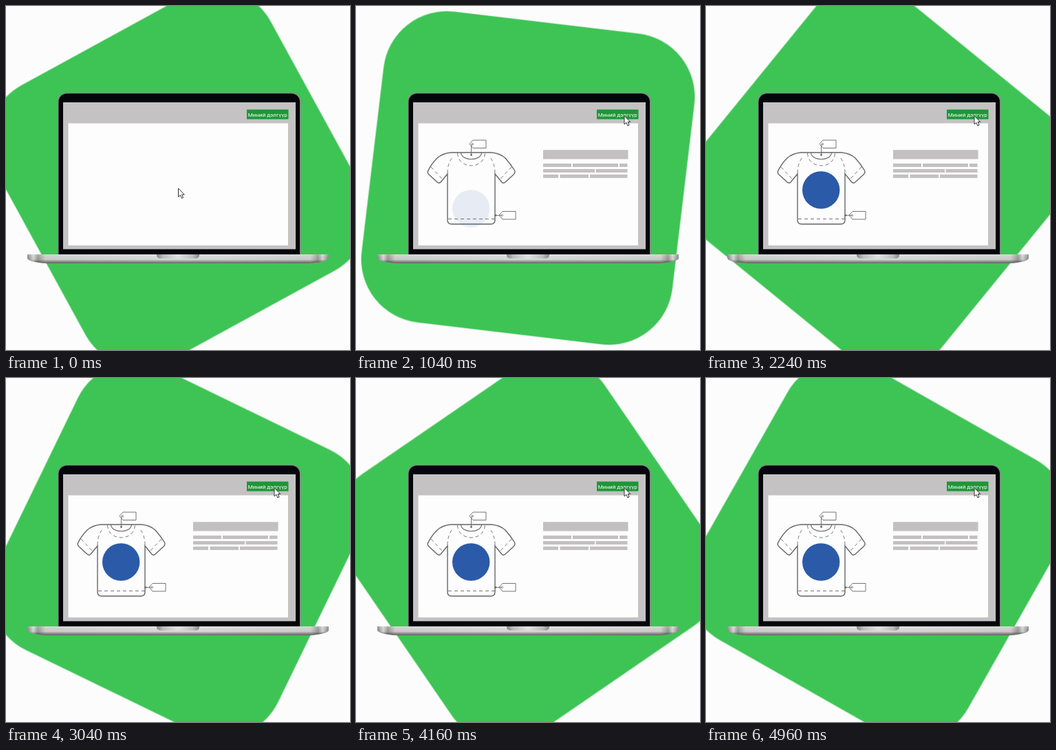
Write an HTML page with a canvas that moves like this. It is 500 by 500 pixels and loops after 5000 ms.

```html
<!DOCTYPE html>
<html lang="mn">
<head>
<meta charset="utf-8">
<style>
  html, body { margin: 0; width: 100%; height: 100%; overflow: hidden; background: #fcfcfc; }
  canvas { display: block; width: 500px; height: 500px; }
</style>
</head>
<body>
<canvas id="stage" width="500" height="500"></canvas>
<script>
const ctx = document.getElementById('stage').getContext('2d');
const LOOP = 5000;
const GREY = '#c2c0c1';
const INK = '#656668';

// Time in ms and angle in degrees of the spinning square.
const spin = [
  [0, -28.5], [520, -114.7], [1520, -225], [2240, -320.7],
  [3040, -424], [4160, -574.3], [4960, -690.3], [5000, -696]
];

const clamp = v => Math.max(0, Math.min(1, v));
const progress = (t, start, end) => clamp((t - start) / (end - start));
const easeInOut = p => p * p * (3 - 2 * p);
const easeOut = p => 1 - (1 - p) ** 2;
const mix = (a, b, p) => a + (b - a) * p;

function slope(i) {
  const a = spin[Math.max(0, i - 1)];
  const b = spin[Math.min(spin.length - 1, i + 1)];
  return (b[1] - a[1]) / (b[0] - a[0]);
}

function spinAngle(t) {
  let i = 0;
  while (i < spin.length - 2 && t >= spin[i + 1][0]) i++;
  const [t0, a] = spin[i], [t1, b] = spin[i + 1];
  const d = t1 - t0, p = (t - t0) / d, q = 1 - p;
  return a * q * q * (1 + 2 * p) + b * p * p * (3 - 2 * p)
    + d * p * q * (slope(i) * q - slope(i + 1) * p);
}

function box(x, y, w, h, fill, radius = 0) {
  ctx.beginPath();
  ctx.roundRect(x, y, w, h, radius);
  ctx.fillStyle = fill;
  ctx.fill();
}

function line(d, width = 1, dash = []) {
  ctx.lineWidth = width;
  ctx.setLineDash(dash);
  ctx.strokeStyle = INK;
  ctx.stroke(new Path2D(d));
  ctx.setLineDash([]);
}

function dot(x, y, r, fill) {
  ctx.beginPath();
  ctx.arc(x, y, r, 0, Math.PI * 2);
  ctx.fillStyle = fill;
  ctx.fill();
}

function gradient(x0, y0, x1, y1, stops) {
  const g = ctx.createLinearGradient(x0, y0, x1, y1);
  stops.forEach(([at, color]) => g.addColorStop(at, color));
  return g;
}

function drawSquare(t) {
  ctx.save();
  ctx.translate(250, 250);
  ctx.rotate(spinAngle(t) * Math.PI / 180);
  box(-227, -227, 454, 454, '#3ec455', 92);
  // Soft rim
  ctx.lineWidth = 2;
  ctx.strokeStyle = 'rgba(62,196,85,.4)';
  ctx.stroke();
  ctx.restore();
}

function drawLaptop() {
  box(75, 126, 353.5, 238, '#858888', [13, 13, 0, 0]);
  box(76.5, 127.3, 350.5, 236, '#03070c', [12, 12, 0, 0]);
  box(83, 140, 338, 213.5, '#c4c2c3');
  box(90.5, 170.5, 319.5, 177.5, '#fdfdfd');

  const base = new Path2D('M31 361H469V367Q467 371 451 373Q446 374 436 374H64Q54 374 49 373Q33 371 31 367Z');
  ctx.fillStyle = gradient(31, 0, 469, 0, [
    [0, '#777'], [.02, '#d4d4d2'], [.035, '#8d8d8b'], [.06, '#cacac8'],
    [.5, '#dadad8'], [.94, '#cacac8'], [.965, '#8d8d8b'], [.98, '#d4d4d2'], [1, '#777']
  ]);
  ctx.fill(base);
  ctx.fillStyle = gradient(0, 361, 0, 374, [
    [0, 'rgba(255,255,255,.25)'], [.55, 'rgba(200,200,198,.1)'],
    [.72, 'rgba(90,90,88,.4)'], [1, 'rgba(60,60,58,.75)']
  ]);
  ctx.fill(base);
  box(219, 361, 62, 6, gradient(219, 0, 281, 0, [
    [0, '#858583'], [.15, '#bcbcb9'], [.5, '#e2e2df'], [.85, '#bcbcb9'], [1, '#858583']
  ]), [0, 0, 5, 5]);
}

function drawButton() {
  box(350, 150.5, 60.5, 14, '#1f9638');
  ctx.fillStyle = '#fff';
  ctx.font = '8px Roboto, sans-serif';
  ctx.textAlign = 'center';
  ctx.textBaseline = 'alphabetic';
  ctx.fillText('Миний дэлгүүр', 380.3, 160.5);
}

function drawTag(x, y) {
  line(`M${x} ${y + 5.5}L${x + 5} ${y}H${x + 24}V${y + 11.5}H${x + 5}Z`, .9);
  ctx.beginPath();
  ctx.arc(x + 4.3, y + 5.7, 1.3, 0, Math.PI * 2);
  ctx.lineWidth = .7;
  ctx.stroke();
}

function drawShirt() {
  line('M138 213H197Q209 214 217 221Q225 230 230.5 239Q232 242 229 245L217 256Q214 259 211 255L202 244V311Q202 317 196 317H139Q133 317 133 311V244L124 255Q121 259 118 256L106 245Q103 242 105 239Q110 229 118 221Q126 214 138 213Z', 1.4);
  line('M152.5 213C153 226 182 226 182.5 213', 1.1);
  line('M147.5 214C149 238 186 238 187.5 214', .9, [5, 4]);
  line('M133 243Q133 229 140 220', .9, [5, 4]);
  line('M202 243Q202 229 195 220', .9, [5, 4]);
  line('M109 234L125 251', .9, [5, 4]);
  line('M226 234L210 251', .9, [5, 4]);
  line('M134 309.5H202', .9, [5, 4]);

  line('M167.5 216V203Q167.5 201 169.5 201', .9);
  dot(167.5, 216.5, 1.4, INK);
  drawTag(165, 195);
  line('M203 304.3H212', .9);
  dot(203, 304.3, 1.4, INK);
  drawTag(208, 298.5);
}

function drawEmblem(t) {
  const rise = 30 * (1 - easeOut(progress(t, 1000, 1800)));
  dot(167.2, 267.5 + rise, 27.2, '#2b5aa8');
}

function drawDescription() {
  box(272, 209.2, 123.5, 13.2, GREY);
  const rows = [
    [229, 272, 41, 315, 66, 383, 11.5],
    [237, 272, 75, 348.5, 46],
    [245, 272, 22, 296.5, 41.5, 340, 54.5]
  ];
  for (const [y, ...bars] of rows) {
    for (let i = 0; i < bars.length; i += 2) box(bars[i], y, bars[i + 1], 5, GREY);
  }
}

function drawCursor(t) {
  const p = easeInOut(progress(t, 0, 480));
  const press = progress(t, 440, 520) - progress(t, 560, 680);
  const size = 1 - .15 * press;
  ctx.save();
  ctx.translate(mix(250, 389.5, p), mix(264.5, 159, p));
  ctx.scale(size, size);
  const arrow = new Path2D('M.5 .5V13L3.4 10.4L5.4 15L7.6 14L5.6 9.6H9.3Z');
  ctx.fillStyle = '#fff';
  ctx.fill(arrow);
  ctx.lineWidth = 1;
  ctx.lineJoin = 'round';
  ctx.strokeStyle = '#333';
  ctx.stroke(arrow);
  ctx.restore();
}

function draw(t) {
  ctx.fillStyle = '#fcfcfc';
  ctx.fillRect(0, 0, 500, 500);
  drawSquare(t);
  drawLaptop();
  drawButton();
  ctx.globalAlpha = progress(t, 640, 960);
  drawShirt();
  drawDescription();
  ctx.globalAlpha = progress(t, 1000, 1400);
  drawEmblem(t);
  ctx.globalAlpha = 1;
  drawCursor(t);
}

const start = performance.now();
function frame() {
  draw((performance.now() - start) % LOOP);
  requestAnimationFrame(frame);
}
frame();
</script>
</body>
</html>
```
